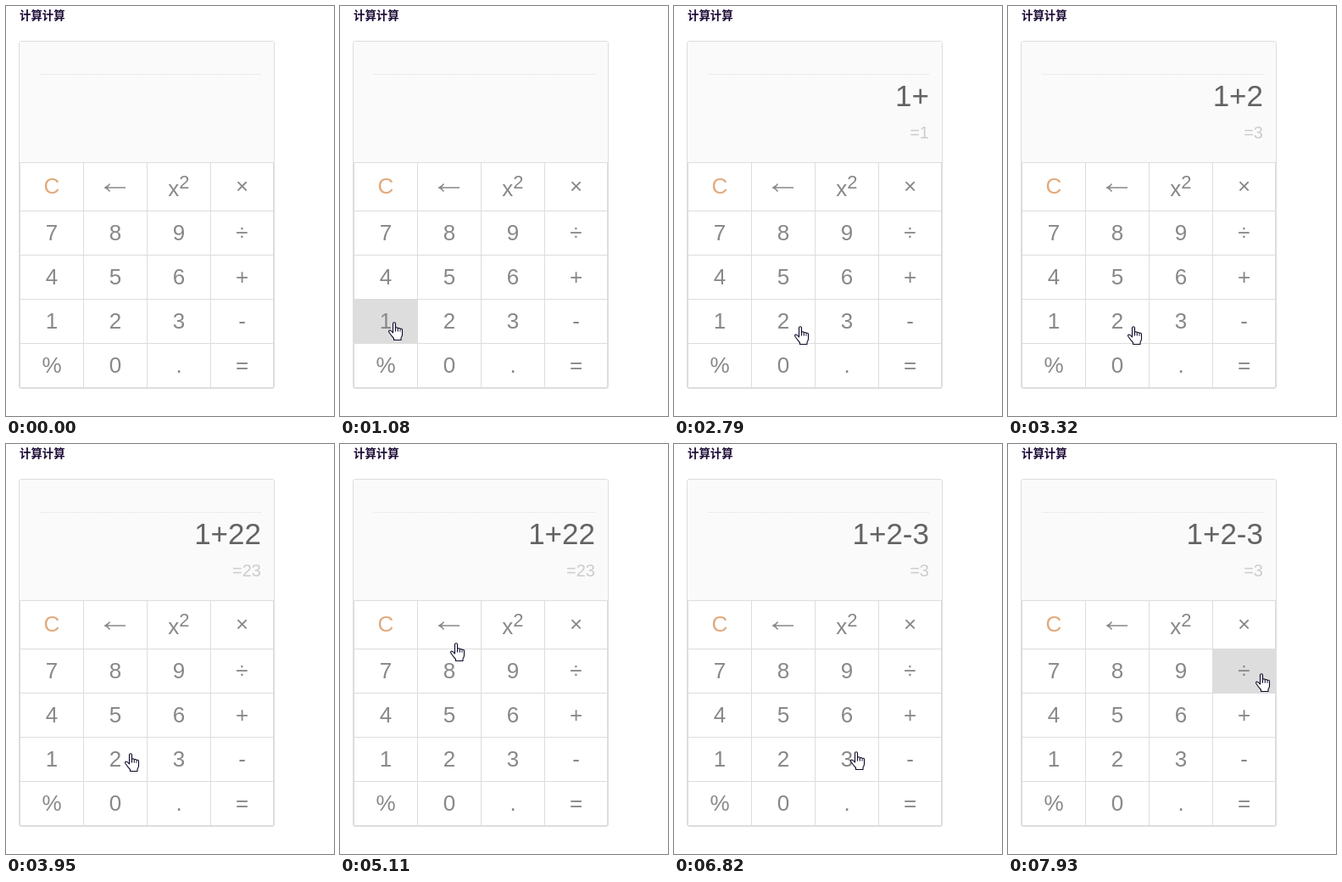
These frames come from a looping animation (387x483 px, 8 s). An HTML page:

```html
<!DOCTYPE html>
<html lang="zh">
<head>
<meta charset="utf-8">
<title>计算计算</title>
<style>
  html, body { margin: 0; width: 100%; height: 100%; overflow: hidden; background: #fff; }
  svg { display: block; width: 387px; height: 483px; font-family: "Liberation Sans", Arial, sans-serif; }
  .title { font: bold 13.4px "Noto Sans CJK SC", "Noto Sans CJK", sans-serif; fill: #1b0a35; }
  .line { stroke: #ddd; fill: none; shape-rendering: crispEdges; }
  .key { font-size: 26px; text-anchor: middle; fill: #888; }
  .screen { text-anchor: end; }
  #formula { font-size: 35px; fill: #636363; }
  #result { font-size: 20px; fill: #ccc; }
</style>
</head>
<body>
<svg viewBox="0 0 387 483">
  <text class="title" x="16" y="16">计算计算</text>
  <rect x="15.5" y="41.5" width="301" height="409" rx="2.5" fill="#fff" stroke="#ddd"/>
  <rect x="16" y="42" width="300" height="142" rx="2" fill="#fafafa"/>
  <path class="line" d="M40 80.5H301" stroke-dasharray="1 1"/>
  <text class="screen" id="formula" x="301" y="118"></text>
  <text class="screen" id="result" x="301" y="156"></text>
  <rect id="pressed" fill="#ddd"/>
  <path class="line" id="grid"/>
  <g id="keys"></g>
  <path d="M117 214H141M122.5 209.5Q120.5 212.5 117 214Q120.5 215.5 122.5 218.5" fill="none" stroke="#888" stroke-width="1.4"/>
  <g id="cursor" stroke="#0a0a28" stroke-width="1.1" stroke-linejoin="round">
    <path fill="#fff" d="M5.5 13V2.2a1.5 1.5 0 0 1 3 0V7.5a1.5 1.5 0 0 1 2.8.6a1.5 1.5 0 0 1 2.7.7a1.4 1.4 0 0 1 2.5 1V15q0 2-1.5 4V21.5H6.5V19.5Q4 17 1 12.5Q0 10.5 1.5 10Q3 9.8 5.5 13z"/>
    <path fill="none" d="M8.5 7.5V11.5M11.3 8.5V11.5M14 9.5V11.5"/>
  </g>
</svg>
<script>
const LOOP = 8000;
const $ = id => document.getElementById(id);
const columns = [16, 91, 166, 241, 315];
const rows = [184, 241, 293, 345, 397, 449];
const centers = [54, 129, 204, 278.5];
const baselines = [221, 276, 328, 380, 432];
const labels = ["C  ×", "789÷", "456+", "123-", "%0.="];

$("grid").setAttribute("d",
  columns.map(x => `M${x + .5} 184V450`).join("") +
  rows.map(y => `M16 ${y + .5}H316`).join(""));

function addKey(label, x, y, style = "") {
  $("keys").innerHTML += `<text class="key" x="${x}" y="${y}" style="${style}">${label}</text>`;
}
labels.forEach((row, r) => [...row].forEach((label, c) => {
  if (label !== " ") addKey(label, centers[c], baselines[r], label === "C" ? "fill:#e2aa7c" : "");
}));
addKey("x", 197.7, 224);
addKey("2", 210.3, 215, "font-size:22px");

// Pointer legs: first step time, last step time, step count, destination
const moves = [
  [460, 910, 7, 57, 372],
  [1400, 1780, 6, 286, 314],
  [2090, 2475, 6, 110, 368],
  [2555, 2790, 4, 142, 377],
  [3320, 3320, 1, 141, 377],
  [3800, 3950, 3, 140, 364],
  [4270, 4420, 3, 238, 363],
  [4570, 5263, 10, 117, 219],
  [5570, 5960, 6, 285, 367],
  [6290, 6440, 3, 208, 362],
  [7050, 7445, 6, 309, 300],
  [7524, 7760, 4, 292, 270],
];

// Clicks: press time, release time, column, row, formula and result on release
const clicks = [
  [1080, 1150, 0, 3, "1", "=1"],
  [1930, 2010, 3, 2, "1+", "=1"],
  [2860, 2940, 1, 3, "1+2", "=3"],
  [3490, 3570, 1, 3, "1+22", "=23"],
  [5340, 5430, 1, 0, "1+2", "=3"],
  [6130, 6210, 3, 3, "1+2-", "=3"],
  [6740, 6820, 2, 3, "1+2-3", "=3"],
  [7930, LOOP, 3, 1, "", ""],
];

const ease = p => p * p * (3 - 2 * p);

function pointerAt(t) {
  let x = 228, y = 478;
  for (const [start, end, steps, toX, toY] of moves) {
    if (t < start) break;
    const interval = (end - start) / (steps - 1) || 1;
    const step = Math.min(steps, Math.floor((t - start) / interval + 1e-6) + 1);
    const p = ease(step / steps);
    x += (toX - x) * p;
    y += (toY - y) * p;
  }
  return [Math.round(x), Math.round(y)];
}

function draw(t) {
  $("cursor").setAttribute("visibility", t < moves[0][0] ? "hidden" : "visible");
  $("cursor").setAttribute("transform", `translate(${pointerAt(t)})`);

  const last = clicks.filter(click => t >= click[1]).pop();
  $("formula").textContent = last ? last[4] : "";
  $("result").textContent = last ? last[5] : "";

  const active = clicks.find(([press, release]) => t >= press && t < release);
  $("pressed").setAttribute("visibility", active ? "visible" : "hidden");
  if (active) {
    const [, , c, r] = active;
    const box = { x: columns[c], y: rows[r], width: columns[c + 1] - columns[c], height: rows[r + 1] - rows[r] };
    for (const name in box) $("pressed").setAttribute(name, box[name]);
  }
}

const began = performance.now();
function frame() {
  draw((performance.now() - began) % LOOP);
  requestAnimationFrame(frame);
}
frame();
</script>
</body>
</html>
```
